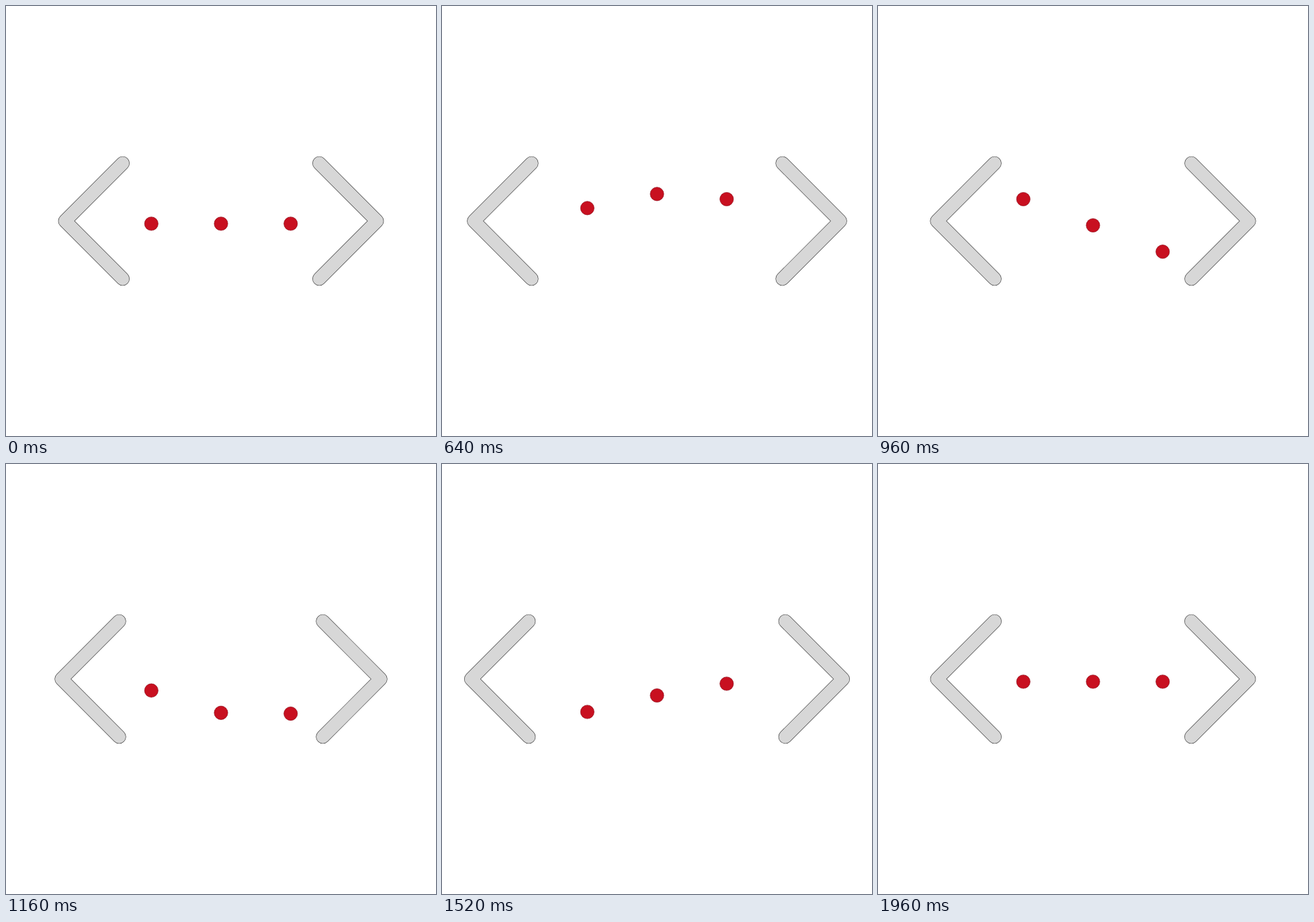
An HTML page that plays this animation: 640x640 px, repeating every 2 s.

```html
<!DOCTYPE html>
<html lang="en">
<head>
<meta charset="utf-8">
<title>Brackets and bouncing dots</title>
<style>
  html, body { margin: 0; width: 100%; height: 100%; overflow: hidden; background: #fff; }
  svg { display: block; width: 100vw; height: 100vh; }
  .bracket path { fill: none; stroke-linecap: round; stroke-linejoin: round; }
  .edge { stroke: #3a3a3a; stroke-width: 20.6; }
  .body { stroke: #d7d7d7; stroke-width: 19.3; }
  circle { fill: #c81020; stroke: #900a18; stroke-width: .7; }
</style>
</head>
<body>
<svg viewBox="0 0 640 640">
  <g class="bracket" id="left">
    <path class="edge" d="M173.7 234L87.9 320L173.7 406"/>
    <path class="body" d="M173.7 234L87.9 320L173.7 406"/>
  </g>
  <g class="bracket" id="right">
    <path class="edge" d="M466.3 234L552.1 320L466.3 406"/>
    <path class="body" d="M466.3 234L552.1 320L466.3 406"/>
  </g>
  <circle cx="216.3" cy="324" r="10.1"/>
  <circle cx="320" cy="324" r="10.1"/>
  <circle cx="423.7" cy="324" r="10.1"/>
</svg>
<script>
const LOOP = 2000, STEP = 40;
const HALF = 480, SPREAD = 45;   // bracket travel time and distance
const LAG = 160;                 // delay from one dot to the next

// Height of the leading dot: [ms, y]
const bounce = [
  [40, 324], [160, 321], [320, 300.8], [480, 279.8], [545, 277],
  [640, 287.5], [800, 326.5], [960, 365.7], [1040, 373], [1085, 374],
  [1200, 369], [1360, 344.5], [1520, 327], [1640, 324]
];

const left = document.getElementById('left');
const right = document.getElementById('right');
const dots = document.querySelectorAll('circle');

// Cubic-bezier easing whose control points lie at y = 0 and y = 1
function bezier(x1, x2) {
  return x => {
    let lo = 0, hi = 1;
    for (let i = 0; i < 24; i++) {
      const t = (lo + hi) / 2, s = 1 - t;
      if (3 * s * s * t * x1 + 3 * s * t * t * x2 + t * t * t < x) lo = t;
      else hi = t;
    }
    return lo * lo * (3 - 2 * lo);
  };
}
const open = bezier(.7, .43);
const close = bezier(.59, .18);

function spread(t) {
  const u = Math.max(0, t - STEP) % (2 * HALF);
  return SPREAD * (u < HALF ? open(u / HALF) : 1 - close((u - HALF) / HALF));
}

// Monotone cubic curve: flat at the ends and at each turning point
const slope = i => (bounce[i + 1][1] - bounce[i][1]) / (bounce[i + 1][0] - bounce[i][0]);
const tangents = bounce.map((p, i) => {
  if (i === 0 || i === bounce.length - 1) return 0;
  const a = slope(i - 1), b = slope(i);
  return a * b > 0 ? 2 * a * b / (a + b) : 0;
});

function height(t) {
  const last = bounce.length - 1;
  if (t <= bounce[0][0]) return bounce[0][1];
  if (t >= bounce[last][0]) return bounce[last][1];
  const i = bounce.findIndex(p => p[0] > t) - 1;
  const [t0, y0] = bounce[i], [t1, y1] = bounce[i + 1];
  const d = t1 - t0, x = (t - t0) / d, w = x * x * (3 - 2 * x);
  return y0 + (y1 - y0) * w
    + d * x * (1 - x) * ((1 - x) * tangents[i] - x * tangents[i + 1]);
}

function draw(now) {
  const t = Math.floor((now % LOOP) / STEP) * STEP;
  const dx = spread(t);
  left.setAttribute('transform', `translate(${-dx} 0)`);
  right.setAttribute('transform', `translate(${dx} 0)`);
  dots.forEach((dot, i) => dot.setAttribute('cy', height(t - (2 - i) * LAG)));
}

const start = performance.now();
function tick() {
  draw(performance.now() - start);
  requestAnimationFrame(tick);
}
tick();
</script>
</body>
</html>
```
